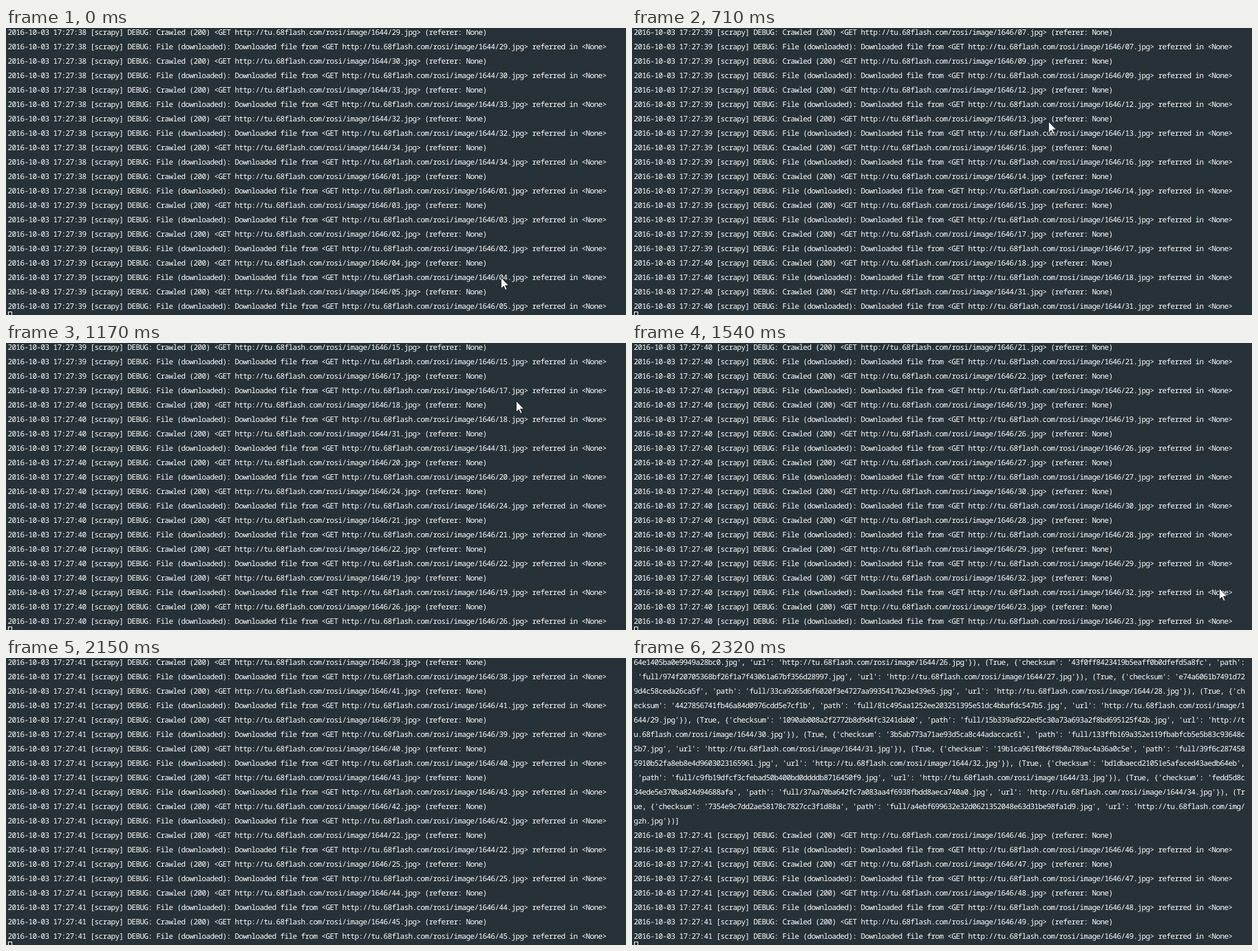
Recreate the animation shown at these times as an HTML page. Size 901 px wide and 418 px high, loop 2420 ms.

```html
<!DOCTYPE html>
<html lang="en">
<head>
<meta charset="utf-8">
<title>Crawler log</title>
<style>
html, body { margin: 0; width: 100%; height: 100%; overflow: hidden; background: #263238; }
svg { display: block; }
text {
  font: 11px "Noto Sans Mono", "DejaVu Sans Mono", monospace;
  letter-spacing: -0.6px;
  white-space: pre;
  text-rendering: geometricPrecision;
  font-variant-ligatures: none;
  fill: #fff;
}
</style>
</head>
<body>
<svg width="901" height="418" viewBox="0 0 901 418">
  <rect width="901" height="418" fill="#263238"/>
  <g id="rows"></g>
  <rect x="3.5" y="413.5" width="5" height="10" fill="none" stroke="#fff"/>
  <path id="mouse" d="M.5 .5V16.5L4.2 13L6.8 18.6L9 17.6L6.5 12H11.5Z" fill="#fff" stroke="#10181c" stroke-width=".8"/>
</svg>
<script>
const LOOP = 2420, STEPS = 27, LEAD = 11;
const ROWS = 20, PITCH = 21, COLS = 148;
const HOST = 'http://tu.68flash.com';

// [refresh step, images scrolled off, pointer x, pointer y]
const KEYS = [
  [0, 0, 719, 363],
  [4, 8, 640, 250],
  [5, 8, 640, 250],
  [8, 14, 605, 136],
  [10, 16, 843, 398],
  [13, 20, 741, 84],
  [17, 26, 853, 357],
  [24, 42, 864, 430],
  [25, 52, 864, 430],
  [26, 55, 864, 430],
];

// Slow downloads, listed under the image they come in after
const LATE = {
  3: [2], 11: [7, 9], 16: [14, 15], 18: ['1644/31'], 24: [21, 22, 19], 30: [28, 29],
  32: [23, 31], 41: [39, 40], 43: [42, '1644/22', 25],
};
const DUMP_AT = 52;

const two = n => String(n).padStart(2, '0');
const link = id => `${HOST}/rosi/image/${id}.jpg`;

function arrivals() {
  const late = Object.values(LATE).flat();
  const ids = [29, 30, 33, 32, 34].map(n => '1644/' + n);
  const add = n => ids.push(typeof n === 'string' ? n : '1646/' + two(n));
  for (let n = 1; n < 50; n++) {
    if (!late.includes(n)) add(n);
    (LATE[n] || []).forEach(add);
  }
  return ids;
}

let seed = 7;
function hex(length) {
  let s = '';
  while (s.length < length) {
    seed = (seed * 16807) % 2147483647;
    s += (seed >> 12 & 15).toString(16);
  }
  return s;
}

// Summary of finished downloads, wrapped at the terminal width
function dumpLines() {
  let s = `${hex(39)}.jpg', 'url': '${link('1644/21')}'})`;
  for (let n = 22; n <= 35; n++) {
    const url = n < 35 ? link('1644/' + n) : HOST + '/img/gzh.jpg';
    s += `, (True, {'checksum': '${hex(32)}', 'path': 'full/${hex(40)}.jpg', 'url': '${url}'})`;
  }
  s += ']';
  const lines = [];
  for (let i = 0; i < s.length; i += COLS) lines.push(s.slice(i, i + COLS));
  return lines;
}

function buildLog() {
  const lines = [];
  arrivals().forEach((id, i) => {
    if (i === DUMP_AT) lines.push(...dumpLines());
    const sec = 38 + (i >= 6) + (i >= 22) + (i >= 39);
    const head = `2016-10-03 17:27:${sec} [scrapy] DEBUG: `;
    const get = `<GET ${link(id)}>`;
    lines.push(`${head}Crawled (200) ${get} (referer: None)`,
      `${head}File (downloaded): Downloaded file from ${get} referred in <None>`);
  });
  return lines;
}

// Scroll and pointer at a refresh step, in whole units
function pose(step) {
  const i = Math.max(1, KEYS.findIndex(k => k[0] >= step));
  const a = KEYS[i - 1], b = KEYS[i];
  const p = (step - a[0]) / (b[0] - a[0]);
  return a.map((v, c) => Math.round(v + (b[c] - v) * p));
}

const log = buildLog();
const mouse = document.getElementById('mouse');
const rows = Array.from({ length: ROWS }, (_, i) => {
  const row = document.createElementNS('http://www.w3.org/2000/svg', 'text');
  row.setAttribute('x', 2.4);
  row.setAttribute('y', 10 + i * PITCH);
  return document.getElementById('rows').appendChild(row);
});

let shown = -1;
function draw(ms) {
  const step = Math.min(STEPS - 1, Math.floor((ms % LOOP + LEAD) * STEPS / LOOP));
  if (step === shown) return;
  shown = step;
  const [, scrolled, x, y] = pose(step);
  rows.forEach((row, i) => { row.textContent = log[2 * scrolled + i]; });
  mouse.setAttribute('transform', `translate(${x} ${y})`);
}

const start = performance.now();
function loop() {
  draw(performance.now() - start);
  requestAnimationFrame(loop);
}
loop();
</script>
</body>
</html>
```
